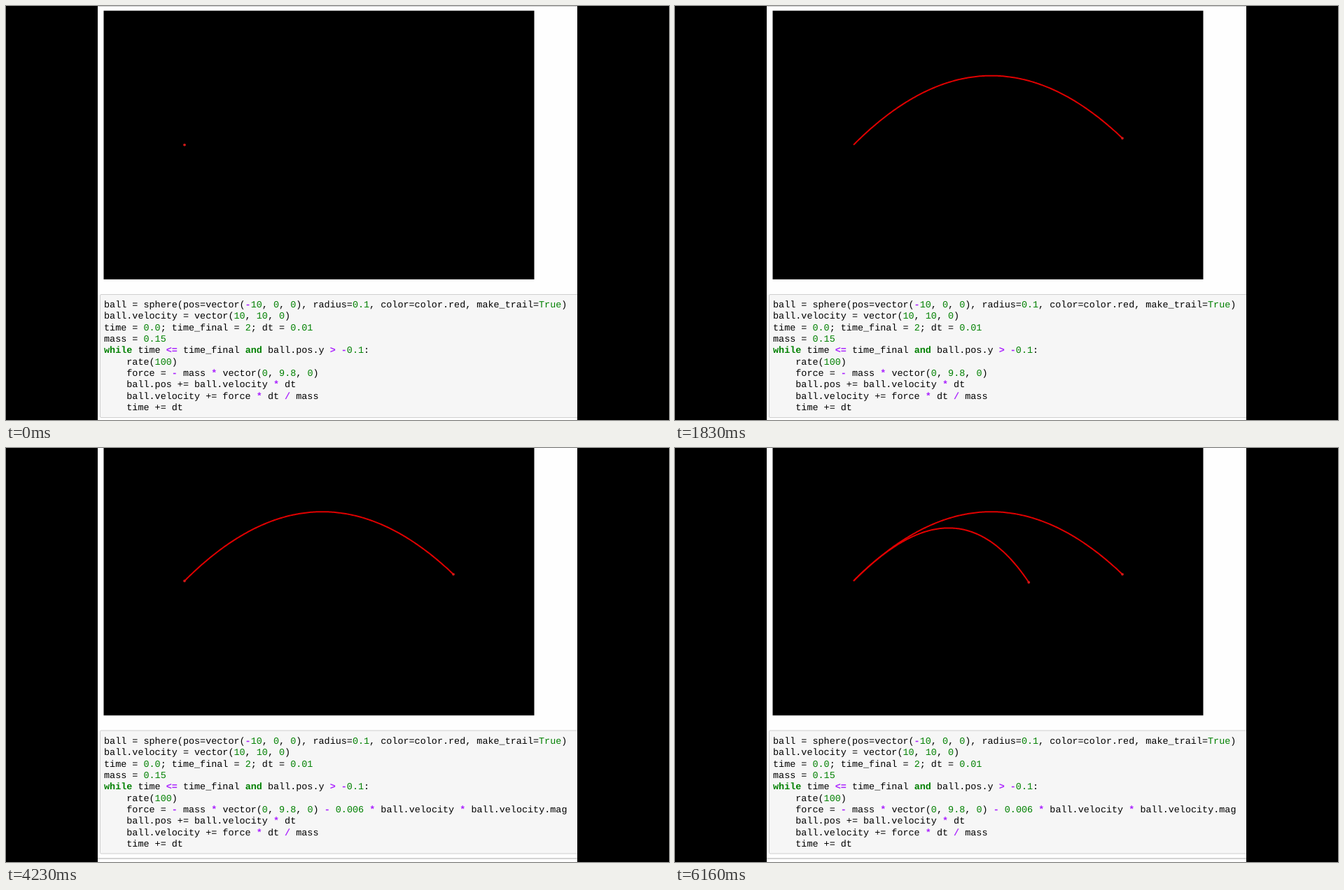
Animation, 947 px wide and 592 px high, one loop 7830 ms. Source, as an HTML page:

```html
<!DOCTYPE html>
<html lang="en">
<head>
<meta charset="utf-8">
<title>Projectile with and without drag</title>
<style>
  html, body { margin: 0; width: 100%; height: 100%; overflow: hidden; background: #000; }
  #stage { position: relative; width: 947px; height: 592px; overflow: hidden; background: #000; }
  #stage * { position: absolute; box-sizing: border-box; }
  #window { left: 131px; top: 0; width: 685px; height: 592px; overflow: hidden; background: #fefefe; }
  #page { left: -131px; top: 0; width: 947px; height: 620px; }
  .rule { left: 131px; width: 685px; height: 1px; }
  #cell { left: 134px; top: 412px; width: 700px; height: 177px; background: #f6f6f6;
          border: 1px solid #cfcfcf; border-radius: 2px; }
  #code { left: 140px; top: 421px; margin: 0; color: #000; text-rendering: geometricPrecision;
          font: 13.45px/16.33px "Liberation Mono", monospace; }
  #stage #code span { position: static; }
  .keyword { color: #008000; font-weight: bold; }
  .number { color: #008000; }
  .operator { color: #a2f; font-weight: bold; }
  #cursor { left: 471px; top: 516px; width: 1px; height: 18px; background: #000; }
  svg { left: 0; top: 0; }
</style>
</head>
<body>
<div id="stage">
  <div id="window">
    <div id="page">
      <div class="rule" id="topRule" style="top: 0; background: #ccc"></div>
      <div class="rule" id="editRule" style="top: 406px; background: #66bb6a"></div>
      <div class="rule" id="nextRule" style="top: 595px; background: #ababab"></div>
      <div id="cell"></div>
      <pre id="code"></pre>
      <div id="cursor"></div>
      <svg width="947" height="620">
        <rect x="139.5" y="6.7" width="615" height="384.2"/>
        <g id="runs" fill="#d01818" stroke-linejoin="round"></g>
      </svg>
    </div>
  </div>
</div>
<script>
const LOOP = 7830, FRAME = 100 / 3;
const EDIT = 3030, CURSOR_ON = 3160, CURSOR_OFF = 3700, RERUN = 4230;
const SCALE = 19.2, DT = 0.01;
const $ = id => document.getElementById(id);

const source = drag => `ball = sphere(pos=vector(-10, 0, 0), radius=0.1, color=color.red, make_trail=True)
ball.velocity = vector(10, 10, 0)
time = 0.0; time_final = 2; dt = 0.01
mass = 0.15
while time <= time_final and ball.pos.y > -0.1:
    rate(100)
    force = - mass * vector(0, 9.8, 0)${drag}
    ball.pos += ball.velocity * dt
    ball.velocity += force * dt / mass
    time += dt`;

function highlight(text) {
  const token = /\b(while|and)\b|\b(True|\d[\d.]*)|(<=|[-*>\/])/g;
  return text.replace(token, (word, keyword, number) => {
    const kind = keyword ? "keyword" : number ? "number" : "operator";
    return `<span class="${kind}">${word.replace("<", "&lt;").replace(">", "&gt;")}</span>`;
  });
}
const plainCode = highlight(source(""));
const dragCode = highlight(source(" - 0.006 * ball.velocity * ball.velocity.mag"));

// Same Euler steps as the listing, in screen coordinates.
function simulate(drag) {
  let x = -10, y = 0, vx = 10, vy = 10;
  const points = [];
  const record = () => points.push([447 + x * SCALE, 198.6 - y * SCALE]);
  record();
  for (let i = 0; i < 200 && y > -0.1; i++) {
    x += vx * DT;
    y += vy * DT;
    const k = drag * Math.hypot(vx, vy);
    vx -= k * vx * DT;
    vy -= (9.8 + k * vy) * DT;
    record();
  }
  return points;
}

function makeRun(drag, clock) {
  const group = document.createElementNS("http://www.w3.org/2000/svg", "g");
  group.innerHTML = '<path fill="none" stroke="#e00000" stroke-width="2"/><circle r="1.9"/>';
  $("runs").append(group);
  return { group, clock, points: simulate(drag), trail: group.firstChild, ball: group.lastChild };
}

// Clock entries: [playback ms, simulated seconds]
const runs = [
  makeRun(0, [[0, 0], [29, 0], [30, 0.28], [800, 1.073], [900, 1.16], [1600, 1.875],
              [1660, 1.948], [1829, 1.948], [1830, 2]]),
  makeRun(0.04, [[RERUN, 0], [5000, 0.77], [5300, 1.077], [5760, 1.578], [5832, 1.578],
                 [6000, 1.757], [6159, 1.757], [6160, 2]])
];

function interpolate(keys, t) {
  const i = keys.findIndex(key => key[0] > t);
  if (i < 0) return keys[keys.length - 1][1];
  if (i === 0) return keys[0][1];
  const [t0, a] = keys[i - 1], [t1, b] = keys[i];
  return a + (b - a) * (t - t0) / (t1 - t0);
}

function drawRun(run, t) {
  const last = run.points.length - 1;
  const step = Math.min(last, Math.round(interpolate(run.clock, t) / DT));
  const [x, y] = run.points[step];
  run.trail.setAttribute("d", "M" + run.points.slice(0, step + 1).join("L"));
  run.ball.setAttribute("cx", x);
  run.ball.setAttribute("cy", y);
}

const show = (element, visible) => { element.style.display = visible ? "" : "none"; };
let shownCode;

function draw(ms) {
  const t = Math.floor((ms % LOOP + 7) / FRAME) * FRAME;
  const rerun = t >= RERUN;
  const code = t >= EDIT ? dragCode : plainCode;
  if (code !== shownCode) $("code").innerHTML = shownCode = code;
  // A transform keeps the half pixel that layout would round away.
  $("page").style.transform = rerun ? "translateY(-8.5px)" : "none";
  show($("topRule"), !rerun);
  show($("nextRule"), rerun);
  show($("editRule"), t >= EDIT && !rerun);
  show($("cursor"), t >= CURSOR_ON && t < CURSOR_OFF);
  show(runs[1].group, rerun);
  runs.forEach(run => drawRun(run, t));
}

const start = performance.now();
function tick() {
  draw(performance.now() - start);
  requestAnimationFrame(tick);
}
tick();
</script>
</body>
</html>
```
